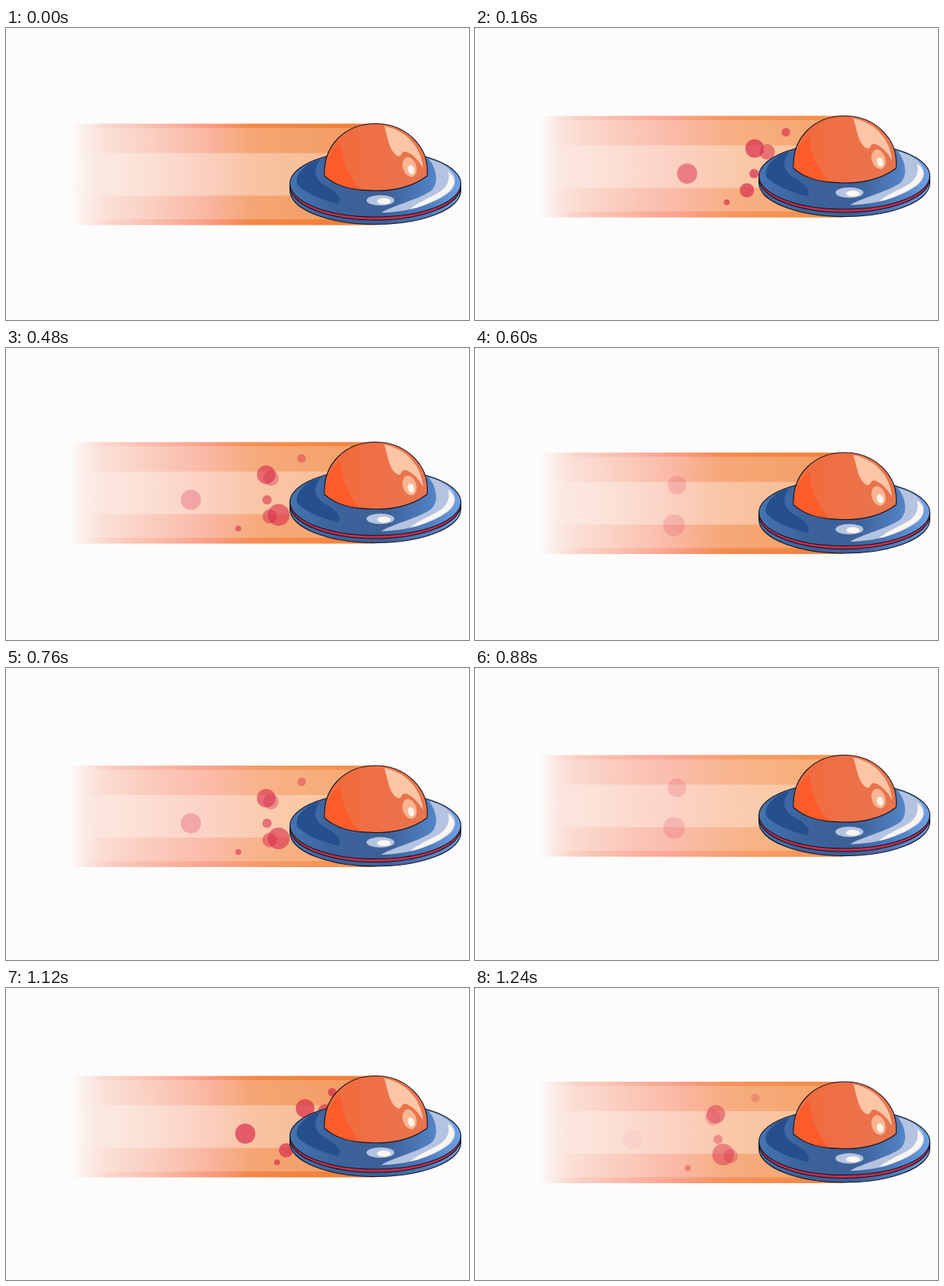
Animation of 596x377 px, one loop 1.28 s. Source, as an HTML page:

```html
<!DOCTYPE html>
<html lang="en">
<head>
<meta charset="utf-8">
<title>Flying saucer</title>
<style>
  html, body { margin: 0; width: 100%; height: 100%; overflow: hidden; background: #fcfcfc; }
  svg { display: block; width: 596px; height: 377px; }
  .line { stroke: #15141c; stroke-width: 1.1; }
</style>
</head>
<body>
<svg viewBox="0 0 596 377">
  <defs>
    <linearGradient id="deep" gradientUnits="userSpaceOnUse" x1="83" x2="475" y1="0" y2="0">
      <stop offset="0" stop-color="#f9b5a0" stop-opacity="0"/>
      <stop offset=".12" stop-color="#f9b09c" stop-opacity=".5"/>
      <stop offset=".3" stop-color="#f9a68f" stop-opacity=".78"/>
      <stop offset=".46" stop-color="#f99a80"/>
      <stop offset=".6" stop-color="#f38748"/>
      <stop offset="1" stop-color="#f07c34"/>
    </linearGradient>
    <linearGradient id="soft" gradientUnits="userSpaceOnUse" x1="83" x2="475" y1="0" y2="0">
      <stop offset="0" stop-color="#fbbcae" stop-opacity="0"/>
      <stop offset=".2" stop-color="#fbb8a8" stop-opacity=".55"/>
      <stop offset=".43" stop-color="#fba898"/>
      <stop offset=".68" stop-color="#f8a06c"/>
      <stop offset="1" stop-color="#f79752"/>
    </linearGradient>
    <linearGradient id="veil" gradientUnits="userSpaceOnUse" x1="83" x2="475" y1="0" y2="0">
      <stop offset="0" stop-color="#fcf6f0" stop-opacity="0"/>
      <stop offset=".12" stop-color="#fcf6f0" stop-opacity=".3"/>
      <stop offset="1" stop-color="#f8f0dc" stop-opacity=".26"/>
    </linearGradient>
    <linearGradient id="core" gradientUnits="userSpaceOnUse" x1="83" x2="475" y1="0" y2="0">
      <stop offset="0" stop-color="#fdf4ee" stop-opacity="0"/>
      <stop offset=".15" stop-color="#fdf4ee" stop-opacity=".45"/>
      <stop offset="1" stop-color="#fdeee0" stop-opacity=".36"/>
    </linearGradient>
    <linearGradient id="disc">
      <stop offset="0" stop-color="#4474b2"/>
      <stop offset=".25" stop-color="#3d639c"/>
      <stop offset=".55" stop-color="#3c5f96"/>
      <stop offset=".82" stop-color="#5080c2"/>
      <stop offset="1" stop-color="#6ea2e6"/>
    </linearGradient>
    <linearGradient id="glass">
      <stop offset="0" stop-color="#f26a3c"/>
      <stop offset=".5" stop-color="#ef6f46"/>
      <stop offset="1" stop-color="#e57650"/>
    </linearGradient>
  </defs>

  <g id="ship">
    <rect x="83" y="123.5" width="392" height="131" fill="url(#deep)"/>
    <rect id="glow" x="83" y="123.5" width="392" height="131" fill="url(#soft)"/>
    <rect x="83" y="129" width="392" height="118" fill="url(#veil)"/>
    <rect x="83" y="161.5" width="392" height="55" fill="url(#core)"/>

    <g id="puffs" fill="#d92d4b"></g>

    <path class="line" fill="url(#disc)" d="M365.5 201V210A110 43.5 0 0 0 585.5 210V201Z"/>
    <path class="line" fill="#c42f4f" d="M365.5 201V204.5A110 43.5 0 0 0 585.5 204.5V201Z"/>
    <ellipse class="line" fill="url(#disc)" cx="475.5" cy="201" rx="110" ry="43"/>
    <path fill="#264f8e" d="M405 170C386 174 371 189 375 202C385 214 408 222 427 227C435 222 425 211 412 204C397 196 394 183 405 170Z"/>
    <path fill="#b4c3e0" d="M544 169C572 176 588 194 572 211C553 228 510 239 483 238.500C496 230 529 222 546 211C558 202 555 182 544 169Z"/>
    <path fill="#f9f5f2" d="M569 185C582 195 579 207 562 217C549 225 532 232 520 234C533 223 556 215 563 208C570 201 571 193 569 185Z"/>
    <ellipse fill="#b4c3e0" cx="482" cy="222.500" rx="18" ry="6.700"/>
    <ellipse fill="#fbf6f0" cx="486.500" cy="223.700" rx="8.800" ry="3.900"/>

    <path class="line" fill="url(#glass)" d="M410 191C408 151 437 123.500 476 123.500C515 123.500 546 154 542 191C525 204 503 210 476 210C447 210 424 204 410 191Z"/>
    <path fill="#fb5c2a" d="M430 148C417 160 410.500 174 410.700 190.500C424 202 437 206.500 456 208.500C441 193 433 174 430 148Z"/>
    <path fill="#fbc5a6" d="M487 126.500C514 132 534 152 537 181C531 171 525 164 516 160C508 157 510 168 504 165C494 160 492 144 487 126.500Z"/>
    <ellipse fill="#fab592" cx="519.500" cy="179.500" rx="8.700" ry="13" transform="rotate(-17 519.5 179.5)"/>
    <ellipse fill="#fdf3ec" cx="521.500" cy="183" rx="4" ry="6" transform="rotate(-17 521.5 183)"/>
  </g>
</svg>
<script>
  const TICK = 40, TICKS = 32;
  const BURSTS = [0, 7, 14, 21, 25];
  const BOB = [0, -20, 16, -20, 0];
  // radius, start x, y, speed per tick, fade rate, end of life
  const PUFFS = [
    [13, 413, 198, 35, .23, 6.2],
    [12, 460, 165.5, 25, .14, 9.3],
    [10, 516, 170, 35, .16, 7.4],
    [6, 452, 198, 23.2, .19, 8],
    [9.3, 392, 219.5, 10.5, .18, 7.9],
    [14, 509, 217.5, 31.6, .14, 9.3],
    [3.8, 424, 235, 25, .2, 8],
    [5.5, 479, 144.5, 19.7, .2, 7.2]
  ];
  const $ = id => document.getElementById(id);
  const ship = $('ship'), glow = $('glow'), puffs = $('puffs');

  const dots = PUFFS.map(([r, , y]) => {
    const dot = document.createElementNS('http://www.w3.org/2000/svg', 'circle');
    dot.setAttribute('r', r);
    dot.setAttribute('cy', y);
    return puffs.appendChild(dot);
  });

  function bobAt(n) {
    const i = Math.floor(n / 8);
    return BOB[i] + (BOB[i + 1] - BOB[i]) * (n % 8) / 8;
  }

  // A new burst stays behind the hull for its first two ticks.
  function ageAt(n) {
    const ages = BURSTS.map(b => n - b).filter(a => a >= 0);
    const [last, previous] = ages.reverse();
    return last < 3 && previous < 9.5 ? previous : last;
  }

  function draw(now) {
    const n = Math.floor(now / TICK) % TICKS;
    const age = ageAt(n);
    ship.setAttribute('transform', `translate(0 ${bobAt(n)})`);
    glow.setAttribute('opacity', 1 - Math.abs(n % 14 - 7) / 7);
    PUFFS.forEach(([, x, , speed, fade, end], i) => {
      const alpha = age < 2 ? 0 : Math.max(0, Math.min(.7, fade * (end - age)));
      dots[i].setAttribute('cx', x - speed * age);
      dots[i].setAttribute('opacity', alpha);
    });
  }

  const start = performance.now();
  function loop() {
    draw(performance.now() - start);
    requestAnimationFrame(loop);
  }
  loop();
</script>
</body>
</html>
```
